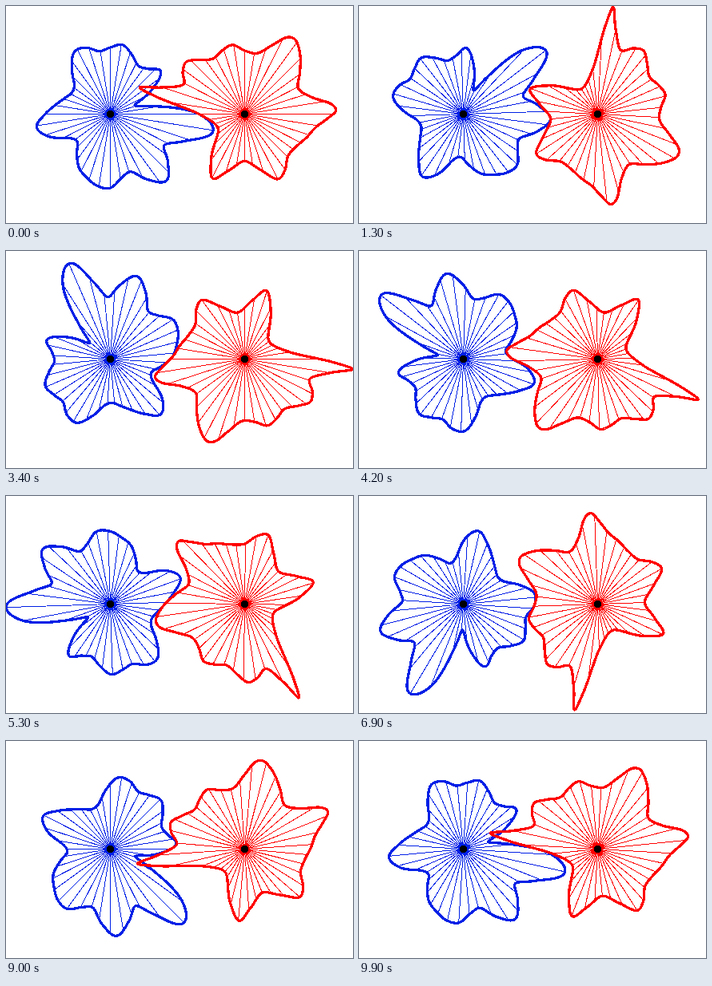
An HTML page for the animation above (10 s loop, 434x272 px).

```html
<!DOCTYPE html>
<html lang="en">
<head>
<meta charset="utf-8">
<title>Non-circular gears</title>
<style>
  html, body { margin: 0; width: 100%; height: 100%; overflow: hidden; background: #fff; }
  svg { display: block; shape-rendering: crispEdges; }
  path { fill: none; stroke-linejoin: round; }
  .spokes { stroke-width: 1; }
  .rim { stroke-width: 3.3; }
</style>
</head>
<body>
<svg width="434" height="272">
  <g id="blue" stroke="#0020e6"><path class="spokes"/><path class="rim"/></g>
  <g id="red" stroke="#f00"><path class="spokes"/><path class="rim"/></g>
  <circle cx="130.5" cy="135.5" r="4.8"/>
  <circle cx="298.5" cy="135.5" r="4.8"/>
</svg>
<script>
const LOOP = 10000, STEP = 100, DIST = 168, SPOKES = 40;

// Radius of the driving gear every 10 degrees
const knots = [
  111, 130, 99, 78, 94, 109, 95, 77, 81, 92.5, 91.5, 85,
  78, 65, 54, 60, 82, 93.5, 81.5, 69, 60, 55, 59, 75,
  90, 88.5, 80, 83.5, 88, 79, 70, 74, 82.5, 59, 32.5, 57
];

function radius(deg) {
  const i = Math.floor(deg / 10), u = deg / 10 - i;
  const [a, b, c, d] = [35, 36, 37, 38].map(k => knots[(i + k) % 36]);
  return b + u / 2 * (c - a + u * (2 * a - 5 * b + 4 * c - d + u * (3 * (b - c) + d - a)));
}

// Rolling without slip: angle of the driven gear for each half degree of the driver
const N = 720, turned = [0];
for (let i = 0; i < N; i++) {
  const r = radius((i + 0.5) * 360 / N);
  turned.push(turned[i] + r / (DIST - r));
}
const driven = turned.map(a => a / turned[N] * 360);

// Outlines as [angle, radius] pairs
const blueRim = [], redRim = [];
for (let i = 0; i <= N; i++) {
  const deg = i * 360 / N, r = radius(deg);
  blueRim.push([deg, r]);
  redRim.push([driven[i], DIST - r]);
}

// Evenly spaced spokes, each reaching the outline
const spokesOf = rim => Array.from({ length: SPOKES }, (_, k) => {
  const deg = k * 360 / SPOKES;
  const i = rim.findIndex(p => p[0] > deg);
  const [a, r] = rim[i - 1], [b, s] = rim[i];
  return [deg, r + (s - r) * (deg - a) / (b - a)];
});

function gear(id, cx, rim, dir) {
  const [spokePath, rimPath] = document.querySelectorAll(`#${id} path`);
  const spokes = spokesOf(rim), hub = `M${cx} 135.5L`;
  return turn => {
    const place = ([deg, r]) => {
      const a = (dir * deg + turn) * Math.PI / 180;
      return (cx + r * Math.cos(a)).toFixed(2) + ' ' + (135.5 + r * Math.sin(a)).toFixed(2);
    };
    spokePath.setAttribute('d', spokes.map(p => hub + place(p)).join(''));
    rimPath.setAttribute('d', 'M' + rim.map(place).join('L') + 'Z');
  };
}

const turnBlue = gear('blue', 130.5, blueRim, 1);
const turnRed = gear('red', 298.5, redRim, -1);

function draw() {
  const phase = Math.floor(performance.now() % LOOP / STEP) * STEP / LOOP;
  const i = Math.floor(phase * N), u = phase * N - i;
  turnBlue(-360 * phase);
  turnRed(180 + driven[i] * (1 - u) + driven[i + 1] * u);
  requestAnimationFrame(draw);
}
draw();
</script>
</body>
</html>
```
